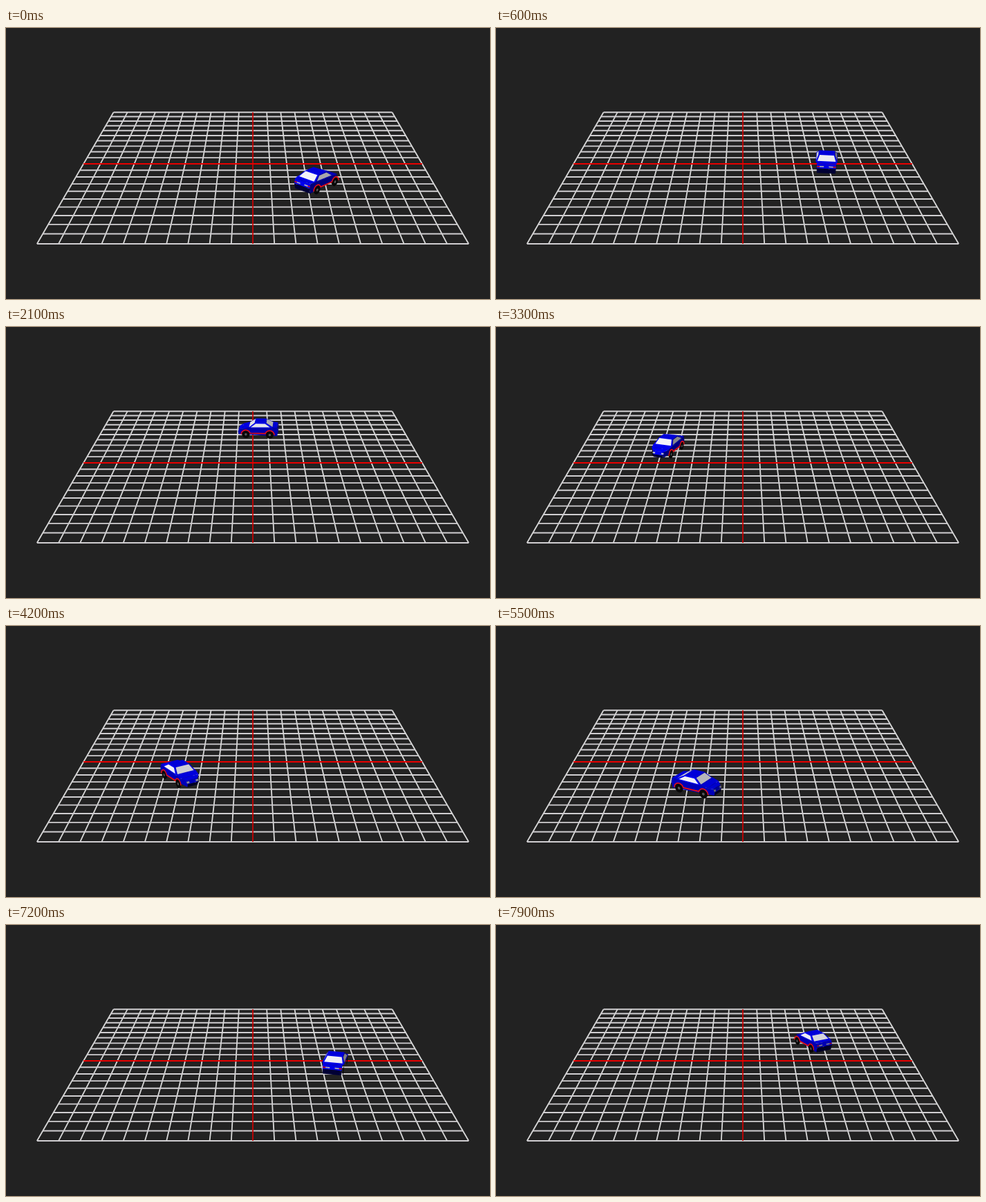
An HTML page with a canvas for the animation above (8 s loop, 700 px wide and 393 px high).

```html
<!DOCTYPE html>
<html>
<head>
<meta charset="utf-8">
<style>
html, body { margin: 0; height: 100%; overflow: hidden; background: #222; }
canvas { display: block; }
</style>
</head>
<body>
<canvas id="stage" width="700" height="393"></canvas>
<script>
const ctx = document.getElementById('stage').getContext('2d');
const FOCAL = 1055, DIST = Math.hypot(16, 40), SIN = 16 / DIST, COS = 40 / DIST;
const RADIUS = 4.9, START = 44, STEP_ANGLE = 6.18;
const LIGHT = [-0.45, 0.7, 0.55];
const BLUE = [0, 0, 245], DARK = [0, 0, 70], GLASS = [236, 236, 242];
const RED = [235, 10, 25], LAMP = [185, 185, 200];

// Camera at (0, 16, 40) looking at the origin
function project(x, y, z) {
  const s = FOCAL / (DIST - z * COS - y * SIN);
  return [357 + x * s, 197 - (y * COS - z * SIN) * s];
}

function trace(points) {
  ctx.beginPath();
  points.forEach(p => ctx.lineTo(...p));
}

function gridLine(a, b, color, width) {
  trace([project(a[0], 0, a[1]), project(b[0], 0, b[1])]);
  ctx.strokeStyle = color;
  ctx.lineWidth = width;
  ctx.stroke();
}

function drawGrid() {
  for (let i = -10; i <= 10; i++) if (i) {
    gridLine([i, -10], [i, 10], '#d8d8d8', 1.8);
    gridLine([-10, i], [10, i], '#d0ced1', 1.9);
  }
  gridLine([0, -10], [0, 10], '#d00000', 1.7);
  gridLine([-10, 0], [10, 0], '#e80000', 1.9);
}

function drawCar(degrees) {
  const a = degrees * Math.PI / 180, c = Math.cos(a), s = Math.sin(a);
  // u: forward, v: to the right (outward), h: height
  const local = ([u, v, h]) => project(RADIUS * c + u * s + v * c, h, RADIUS * s - u * c + v * s);

  function shade(points, color) {
    const n = [0, 0, 0];
    points.forEach((p, i) => {
      const q = points[(i + 1) % points.length];
      for (let k = 0; k < 3; k++) {
        const k1 = (k + 1) % 3, k2 = (k + 2) % 3;
        n[k] += p[k1] * q[k2] - p[k2] * q[k1];
      }
    });
    const [u, v, h] = n.map(x => x / Math.hypot(...n));
    const dot = LIGHT[0] * (u * s + v * c) + LIGHT[1] * h + LIGHT[2] * (v * s - u * c);
    const k = 0.5 + 0.55 * Math.max(0, dot);
    return `rgb(${color.map(x => Math.round(x * k))})`;
  }

  function face(points, color) {
    const p = points.map(local);
    const area = p.reduce((sum, [x, y], i) => {
      const [nx, ny] = p[(i + 1) % p.length];
      return sum + x * ny - nx * y;
    }, 0);
    if (area <= 0) return false;
    trace(p);
    ctx.closePath();
    ctx.fillStyle = shade(points, color);
    ctx.fill();
    return true;
  }

  // Profile points are [u, h, half width], walked from front to rear over the top
  const strip = ([u, h, w], [u2, h2, w2], color) =>
    face([[u, -w, h], [u, w, h], [u2, w2, h2], [u2, -w2, h2]], color);

  function inset(p, q, color) {
    const at = k => p.map((n, i) => (n + (q[i] - n) * k) * (i == 2 ? 0.88 : 1));
    strip(at(0.08), at(0.92), color);
  }

  function flank(profile, side, color) {
    const points = profile.map(([u, h, w]) => [u, side * w, h]);
    return face(side > 0 ? points.reverse() : points, color);
  }

  function arc(u, side, r, from, to) {
    return Array.from({ length: 15 }, (_, i) => {
      const t = (from + (to - from) * i / 14) * Math.PI;
      return local([u + r * Math.cos(t), side * 0.62, 0.25 + r * Math.sin(t)]);
    });
  }

  function disc(u, side, r, color) {
    trace(arc(u, side, r, 0, 2));
    ctx.fillStyle = color;
    ctx.fill();
  }

  function wheels(side) {
    trace([...arc(0.77, side, 0.29, 0, 0.9), ...arc(-0.77, side, 0.29, 0.1, 1)]);
    ctx.strokeStyle = '#e81010';
    ctx.lineWidth = 1.7;
    ctx.stroke();
    for (const u of [0.77, -0.77]) {
      disc(u, side, 0.25, '#080808');
      disc(u, side, 0.08, '#55555c');
    }
  }

  for (const side of [-1, 1])
    for (const u of [0.77, -0.77]) disc(u, side * 0.9, 0.23, '#080808');

  const body = [[1.26, 0.15, 0.32], [1.3, 0.34, 0.32], [1.22, 0.52, 0.36], [0.98, 0.61, 0.56],
    [0.6, 0.7, 0.62], [-0.95, 0.75, 0.62], [-1.25, 0.73, 0.54], [-1.31, 0.46, 0.54],
    [-1.24, 0.15, 0.52]];
  const paint = [DARK, BLUE, BLUE, BLUE, BLUE, BLUE, BLUE, DARK];
  for (const side of [-1, 1]) if (flank(body, side, BLUE)) wheels(side);
  paint.forEach((color, i) => strip(body[i], body[i + 1], color));

  const lamp = (u, h, u2, h2, v, v2, color) =>
    face([[u, v, h], [u, v2, h], [u2, v2, h2], [u2, v, h2]], color);
  for (const side of [-1, 1]) {
    const pair = (v, v2) => side > 0 ? [v, v2] : [-v2, -v];
    lamp(1.29, 0.38, 1.25, 0.47, ...pair(0.2, 0.36), LAMP);
    lamp(-1.28, 0.6, -1.29, 0.53, ...pair(0.38, 0.53), RED);
    lamp(-1.28, 0.6, -1.29, 0.53, ...pair(0.14, 0.38), LAMP);
  }

  const cabin = [[0.6, 0.69, 0.6], [0.18, 1, 0.45], [-0.5, 1, 0.45], [-0.98, 0.74, 0.6]];
  const windows = [[0.46, 0.73, 0.59], [0.14, 0.95, 0.48], [-0.46, 0.95, 0.48], [-0.78, 0.76, 0.59]];
  for (const side of [-1, 1]) {
    flank(cabin, side, BLUE);
    flank(windows, side, GLASS);
  }
  for (let i = 0; i < 3; i++) strip(cabin[i], cabin[i + 1], BLUE);
  inset(cabin[0], cabin[1], GLASS);
  inset(cabin[2], cabin[3], GLASS);
}

function draw(now) {
  const tick = Math.floor(now % 8000 / 100);
  // The car pauses between 4.5 s and 5.5 s
  const step = tick < 55 ? Math.min(tick, 45) : tick - 9;
  ctx.fillStyle = '#222';
  ctx.fillRect(0, 0, 700, 393);
  drawGrid();
  drawCar(START - STEP_ANGLE * step);
  requestAnimationFrame(() => draw(performance.now() - begin));
}

const begin = performance.now();
draw(0);
</script>
</body>
</html>
```
